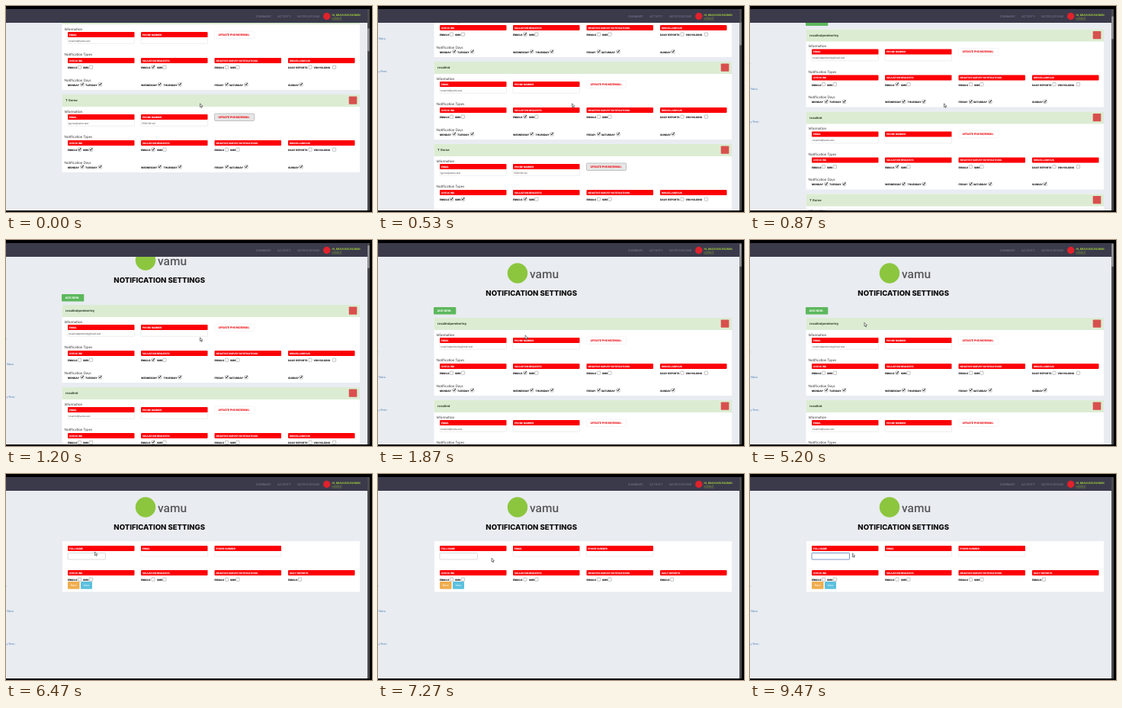
Write an HTML page with a canvas that moves like this. It is 480 px wide and 270 px high and loops after 9.54 s.

```html
<!DOCTYPE html>
<html lang="en">
<head>
<meta charset="utf-8">
<title>Notification settings</title>
<style>
html, body { margin: 0; width: 100%; height: 100%; overflow: hidden; background: #000; }
canvas { display: block; width: 480px; height: 270px; }
</style>
</head>
<body>
<canvas id="stage" width="480" height="270"></canvas>
<script>
const LOOP = 9540, STEP = 1000 / 15, FORM_OPENS = 5930, FIELD_FOCUS = 8800;
const ctx = document.getElementById('stage').getContext('2d');
const COLS = [81, 177, 273.5, 370];
const BOLD = '800', RED = '#fb0006';

// time, scroll offset
const SCROLL = [[70, 202], [870, 71], [1200, 17], [1304, 0]];
// time, pointer tip x, y
const POINTER = [
  [1530, 254, 127.5], [1870, 192, 124.5], [2130, 152, 110], [5070, 152, 110],
  [5200, 149.5, 108], [5530, 96, 105], [5800, 96, 105], [5930, 90, 95],
  [6200, 90, 95], [6800, 148.5, 110], [8330, 148.5, 110], [8600, 118, 105],
  [9130, 118, 105], [9470, 134, 103.5]
];
const CARDS = [
  { name: 'rosalindpemberley', email: 'rosalindpemberley@mail.test', checks: [2] },
  { name: 'rosalind', email: 'rosalind@vamu.test', checks: [2] },
  { name: 'T Gorse', email: 'tgorse@vamu.test', phone: '5550100142', checks: [0, 1, 2], pressed: true }
];
const TYPES = [
  ['EMAILS', 81, 94], ['SMS', 101, 109], ['EMAILS', 177, 190.5], ['SMS', 198, 205.5],
  ['EMAILS', 273.5, 287], ['SMS', 294, 301.5], ['DAILY REPORTS', 370, 396.5], ['VIN HOLDING', 403.5, 428]
];
const DAYS = [
  ['MONDAY', 81, 97.5], ['TUESDAY', 104, 121], ['WEDNESDAY', 177, 199], ['THURSDAY', 206.5, 225.5],
  ['FRIDAY', 273.5, 287], ['SATURDAY', 293, 312.5], ['SUNDAY', 370, 384.5]
];

function sample(keys, t) {
  let i = 1;
  while (i < keys.length - 1 && t > keys[i][0]) i++;
  const a = keys[i - 1], b = keys[i];
  const k = Math.min(1, Math.max(0, (t - a[0]) / (b[0] - a[0])));
  return a.slice(1).map((v, j) => v + (b[j + 1] - v) * k);
}

function rect(x, y, w, h, fill, radius = 0, border) {
  ctx.beginPath();
  ctx.roundRect(x, y, w, h, radius);
  ctx.fillStyle = fill;
  ctx.fill();
  if (border) {
    ctx.strokeStyle = border;
    ctx.lineWidth = 0.7;
    ctx.stroke();
  }
}

function disc(x, y, r, fill) {
  ctx.beginPath();
  ctx.arc(x, y, r, 0, 7);
  ctx.fillStyle = fill;
  ctx.fill();
}

// Text vertically centred on its capitals
function text(s, x, y, size, fill, weight = '400', family = 'Inter', align = 'left') {
  ctx.font = `${weight} ${size}px ${family}, sans-serif`;
  ctx.textAlign = align;
  ctx.fillStyle = fill;
  ctx.fillText(s, x, y + size * 0.36);
}

function label(s, x, y) {
  rect(x, y, 87.5, 7, RED, 1);
  text(s, x + 2, y + 3.5, 3.1, '#fff', BOLD);
}

function field(x, y, w, h, border = '#dcdcdc') {
  rect(x, y, w, h, '#fff', 0.6, border);
}

function checkbox([s, x, boxX], y, checked) {
  text(s, x, y, 3.25, '#111', BOLD);
  rect(boxX + 0.4, y - 2.9, 4.2, 4.2, '#fff', 0.5, '#aaa');
  if (!checked) return;
  ctx.beginPath();
  ctx.moveTo(boxX + 1.2, y - 1.2);
  ctx.lineTo(boxX + 2.2, y + 0.3);
  ctx.lineTo(boxX + 4.2, y - 2.9);
  ctx.strokeStyle = '#222';
  ctx.lineWidth = 1;
  ctx.stroke();
}

function heading(s, y) {
  text(s, 76.5, y, 4.6, '#333', '400', 'Lato');
}

function card(c, y) {
  rect(73.5, y, 390.5, 102, '#fff');
  rect(73.5, y, 390.5, 16, '#dcecd3');
  text(c.name, 78, y + 8, 4.1, '#40543a', BOLD);
  rect(449.7, y + 2.5, 10.6, 10.3, '#d8504d', 0.8);

  heading('Information', y + 22.2);
  field(COLS[0], y + 32, 87.5, 9.3, '#e9e9e9');
  field(COLS[1], y + 32, 87.5, 9.3, '#e9e9e9');
  label('EMAIL', COLS[0], y + 26);
  label('PHONE NUMBER', COLS[1], y + 26);
  text(c.email, 82, y + 37.6, 3.1, '#333', '400', 'Open Sans');
  text(c.phone || '', 178, y + 37.6, 3.1, '#333', '400', 'Open Sans');
  rect(273.5, y + 25, 52, 9.5, c.pressed ? '#e6e6e6' : '#fff', 1, c.pressed ? '#adadad' : '#f1f1f1');
  text('UPDATE PHONE/EMAIL', 299, y + 29.6, 3.6, '#f0141a', BOLD, 'Inter', 'center');

  heading('Notification Types', y + 55.7);
  ['CHECK INS', 'VALUATION REQUESTS', 'NEGATIVE SURVEY NOTIFICATIONS', 'MISCELLANEOUS']
    .forEach((s, i) => label(s, COLS[i], y + 60));
  TYPES.forEach((type, i) => checkbox(type, y + 73, c.checks.includes(i)));

  heading('Notification Days', y + 89);
  DAYS.forEach(day => checkbox(day, y + 95.7, true));
}

function form(focused) {
  rect(74, 88, 390, 66.5, '#fff');
  field(81, 103.5, 49.5, 8.5, focused ? '#3f66b0' : '#ccc');
  field(COLS[1], 100, 87.5, 8, '#e9e9e9');
  field(COLS[2], 100, 87.5, 8, '#e9e9e9');
  ['FULL NAME', 'EMAIL', 'PHONE NUMBER'].forEach((s, i) => label(s, COLS[i], 94));
  ['CHECK INS', 'VALUATION REQUESTS', 'NEGATIVE SURVEY NOTIFICATIONS', 'DAILY REPORTS']
    .forEach((s, i) => label(s, COLS[i], 126));
  TYPES.slice(0, 6).forEach(type => checkbox(type, 139, false));
  checkbox(['EMAILS', 370, 383], 139, false);
  rect(81, 141, 15.5, 9.8, '#f0ad4e', 1);
  rect(98, 141, 15, 9.8, '#5bc0de', 1);
  text('Back', 88.7, 146, 3.4, '#fff', '400', 'Inter', 'center');
  text('Save', 105.5, 146, 3.4, '#fff', '400', 'Inter', 'center');
}

function page(scroll, t) {
  ctx.save();
  ctx.translate(0, -scroll);
  disc(183, 43.5, 13.2, '#8cc63f');
  text('vamu', 199, 44.2, 15.5, '#58595b', '500', 'Roboto');
  text('NOTIFICATION SETTINGS', 201.2, 70, 9.55, '#0a0a0a', BOLD, 'Inter', 'center');
  text('e', -1.5, 147, 4, '#4a7fb5', '400', 'Lato');
  text('Nora', 1, 180, 4, '#4a7fb5', '400', 'Lato');
  text('y Fern', 0.5, 223, 4, '#4a7fb5', '400', 'Lato');
  if (t < FORM_OPENS) {
    rect(73, 88, 29.3, 9.5, '#5cb85c', 1);
    text('ADD NEW..', 87.5, 92.7, 3.7, '#fff', '700', 'Inter', 'center');
    CARDS.forEach((c, i) => card(c, 102 + i * 108));
  } else {
    form(t >= FIELD_FOCUS);
  }
  ctx.restore();
}

function chrome(scroll, scrollable) {
  rect(0, 4, 474, 18, '#3b3a4b');
  [['SUMMARY', 328], ['ACTIVITY', 356], ['NOTIFICATIONS', 382]]
    .forEach(([s, x]) => text(s, x, 13.2, 3.8, '#77758a', '500'));
  disc(420.7, 13.5, 4.7, '#e0222c');
  text('HI, BRAVOKELPADMIN', 427.5, 12, 3.4, '#a4cf3c', '700');
  text('LOGOUT', 427.5, 16.3, 3.1, '#8fb83a');
  rect(427.5, 17.8, 13, 0.4, '#8fb83a');
  rect(474, 4, 3, 264, '#4a4a4e');
  if (scrollable) rect(474.3, 5 + scroll * 0.12, 2.4, 30, '#9a9a9e', 1);
  rect(0, 0, 480, 4, '#000');
  rect(477, 0, 3, 270, '#000');
  rect(0, 268, 480, 2, '#000');
}

function pointer([x, y]) {
  ctx.beginPath();
  [[0, 0], [0, 4.8], [1.1, 3.8], [1.9, 5.6], [2.7, 5.2], [2, 3.5], [3.4, 3.4]]
    .forEach(([dx, dy]) => ctx.lineTo(x + 0.5 + dx, y + 0.3 + dy));
  ctx.closePath();
  ctx.fillStyle = '#fff';
  ctx.strokeStyle = '#444';
  ctx.lineWidth = 0.7;
  ctx.fill();
  ctx.stroke();
}

function draw(now) {
  const t = Math.floor((now % LOOP) / STEP) * STEP;
  const [scroll] = sample(SCROLL, t);
  rect(0, 0, 480, 270, '#e9ecf1');
  page(scroll, t);
  chrome(scroll, t < FORM_OPENS);
  pointer(sample(POINTER, t));
  requestAnimationFrame(draw);
}

ctx.textRendering = 'geometricPrecision';
requestAnimationFrame(draw);
</script>
</body>
</html>
```
